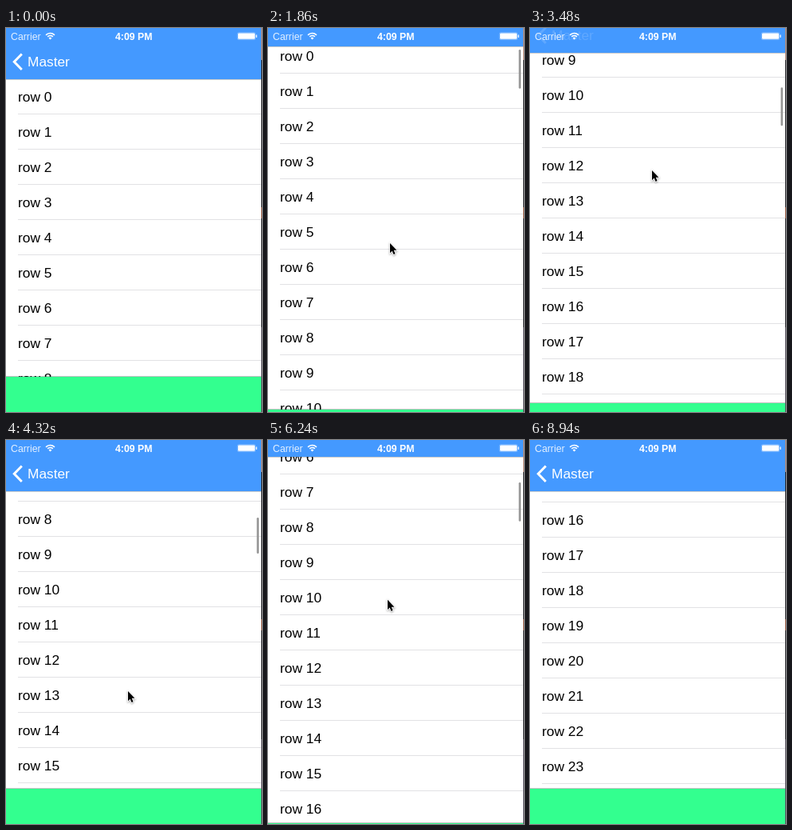
Write an HTML page with a canvas that moves like this. It is 321 px wide and 480 px high and loops after 9000 ms.

```html
<!DOCTYPE html>
<html lang="en">
<head>
<meta charset="utf-8">
<title>Scrolling bars</title>
<style>
html, body { margin: 0; width: 100%; height: 100%; overflow: hidden; background: #fff; }
canvas { display: block; }
</style>
</head>
<body>
<canvas id="stage" width="321" height="480"></canvas>
<script>
const ctx = document.getElementById('stage').getContext('2d');
const LOOP = 9000, STEP = 60, ROW = 44, BAR = 44;
const FONT = '"Liberation Sans", Arial, sans-serif';
const BLUE = '#4499ff', GREEN = '#33ff8f';

// Eased progress from 0 to 1 between two times.
function ease(t, from, to) {
  const u = Math.min(1, Math.max(0, (t - from) / (to - from)));
  return u * u * (3 - 2 * u);
}

// A start value plus eased moves of [from, to, distance].
const motion = (start, ...moves) => t =>
  moves.reduce((sum, [from, to, distance]) => sum + distance * ease(t, from, to), start);

const scroll = motion(0, [1590, 2880, 454], [3180, 4980, -165], [5960, 7500, 458], [7620, 8040, -57]);
const hidden = motion(0, [1140, 2000, 1], [3180, 4080, -1], [5220, 6360, 1], [7620, 8040, -1]);
const mouseX = motion(159, [180, 960, -6], [5220, 6240, -3], [6240, 7140, 3]);
const mouseY = motion(-12, [180, 960, 372], [1140, 2580, -184], [3420, 5040, 235],
  [5220, 6830, -305], [7620, 8040, 51]);
const indicator = motion(0, [1140, 1260, 1], [8040, 8160, -1]);

function box(color, x, y, w, h) {
  ctx.fillStyle = color;
  ctx.fillRect(x, y, w, h);
}

function label(text, x, y, size, color = '#fff', weight = '') {
  ctx.font = `${weight} ${size}px ${FONT}`;
  ctx.fillStyle = color;
  ctx.fillText(text, x, y);
}

function pill(x, y, w, h, r) {
  ctx.beginPath();
  ctx.roundRect(x, y, w, h, r);
}

function drawRows(offset) {
  const first = Math.max(0, Math.floor(offset / ROW) - 2);
  for (let n = first; n < first + 15; n++) {
    const y = 64 + n * ROW - offset;
    label('row ' + n, 15, y + 28, 17.4, '#000');
    box('#e2e2e4', 15, y + 43, 305, 1);
  }
}

function drawIndicator(offset, hide, top, alpha) {
  ctx.globalAlpha = alpha;
  ctx.fillStyle = '#949494';
  const travel = (offset - BAR * hide) * (.0885 + .013 * hide);
  pill(314.5, top + 3 + travel, 2.5, 45 + 4 * hide, 1.25);
  ctx.fill();
  ctx.globalAlpha = 1;
}

function drawStatus() {
  label('Carrier', 6, 14.5, 12.3, '#e4f0ff');
  label('4:09 PM', 137, 14.5, 12.3, '#fff', 'bold');
  ctx.strokeStyle = ctx.fillStyle = '#fff';
  ctx.lineWidth = 1.7;
  for (const r of [4.5, 7.5]) {
    ctx.beginPath();
    ctx.arc(55.5, 14, r, -Math.PI * .76, -Math.PI * .24);
    ctx.stroke();
  }
  ctx.beginPath();
  ctx.moveTo(55.5, 14.5);
  ctx.arc(55.5, 14, 2.3, -Math.PI * .8, -Math.PI * .2);
  ctx.fill();
  ctx.strokeStyle = 'rgba(255,255,255,.6)';
  ctx.lineWidth = .5;
  pill(290.3, 5.8, 22.4, 8.8, 1.6);
  ctx.stroke();
  pill(291, 6.6, 21, 7.2, 1);
  ctx.fill();
  box('#fff', 313.3, 8.5, 1.3, 3.4);
}

function drawBars(hide, shift) {
  const top = 64 - shift, bottom = 436 + shift;
  box(BLUE, 0, 0, 320, top);
  box('rgba(0,0,0,.2)', 0, top, 320, 1);
  ctx.globalAlpha = Math.max(0, 1 - hide * 1.15);
  label('Master', 27, 48 - shift, 17.3);
  ctx.strokeStyle = '#fff';
  ctx.lineWidth = 3;
  ctx.stroke(new Path2D(`M19.8 ${32.5 - shift}l-9.5 9.8 9.5 9.7`));
  ctx.globalAlpha = 1;
  drawStatus();
  box('rgba(0,0,0,.25)', 0, bottom - 1, 320, 1);
  box(GREEN, 0, bottom, 320, 480 - bottom);
}

function drawEdge() {
  box('#26262b', 320, 0, 1, 480);
  box('#b98a78', 320, 0, 1, 40);
  box('#96583f', 320, 224, 1, 14);
  box('#55505c', 320, 374, 1, 106);
}

function drawPointer(x, y) {
  ctx.save();
  ctx.translate(x, y + 1);
  ctx.scale(.82, .86);
  const shape = new Path2D('M0 0V14.2L3.3 11.2 5.5 16.4 8 15.3 5.8 10.3H10.3Z');
  ctx.lineWidth = 1.8;
  ctx.strokeStyle = '#fff';
  ctx.shadowColor = 'rgba(0,0,0,.4)';
  ctx.shadowBlur = 2.5;
  ctx.shadowOffsetY = 1;
  ctx.stroke(shape);
  ctx.shadowColor = 'transparent';
  ctx.fillStyle = '#000';
  ctx.fill(shape);
  ctx.restore();
}

function draw(now) {
  const t = Math.floor((now % LOOP) / STEP) * STEP;
  const offset = Math.round(scroll(t)), hide = hidden(t);
  const shift = Math.round(BAR * hide);
  box('#fff', 0, 0, 321, 480);
  drawRows(offset);
  drawIndicator(offset, hide, 64 - shift, indicator(t));
  drawBars(hide, shift);
  drawEdge();
  if (t >= 180 && t < 8160) drawPointer(mouseX(t), mouseY(t));
}

const start = performance.now();
function tick() {
  draw(performance.now() - start);
  requestAnimationFrame(tick);
}
tick();
</script>
</body>
</html>
```
